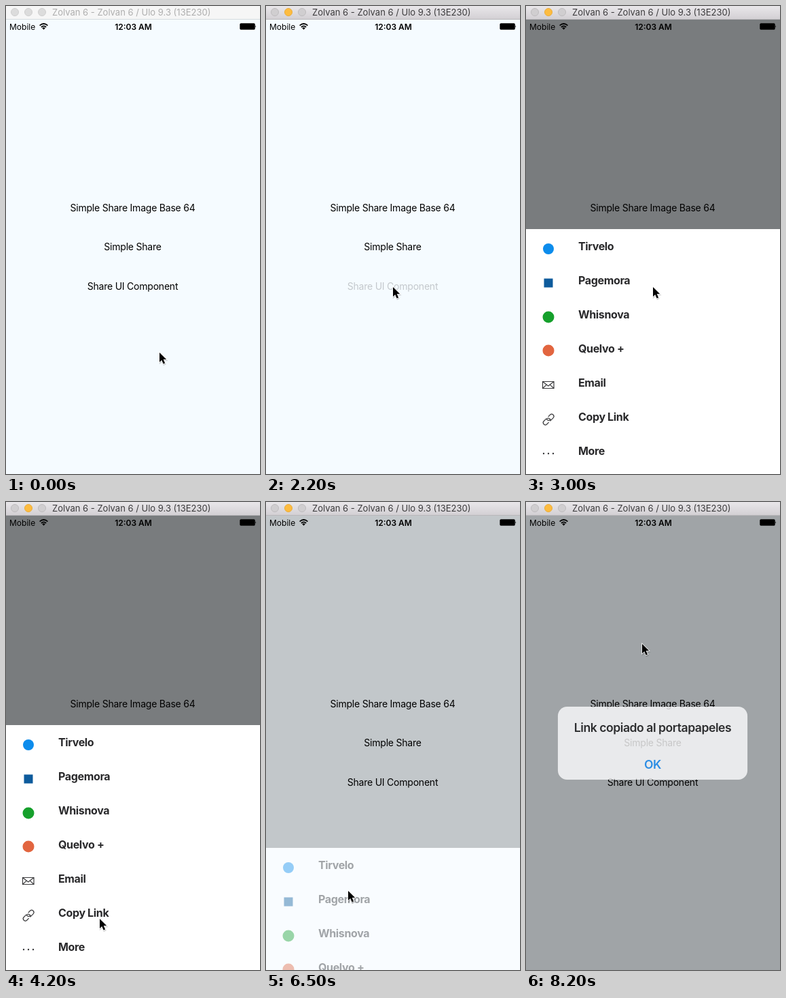
An HTML page for the animation above (8300 ms loop, 374x686 px).

```html
<!DOCTYPE html>
<html lang="en">
<head>
<meta charset="utf-8">
<title>Share sheet</title>
<style>
  html, body { margin: 0; width: 100%; height: 100%; overflow: hidden; background: #f5fbff; }
  svg { display: block; font-family: Inter, Roboto, sans-serif; }
  .page { font-size: 14px; letter-spacing: -.22px; text-anchor: middle; }
  .status { font-size: 12px; }
  .label { font-size: 16px; font-weight: 650; letter-spacing: -.35px; fill: #29292b; }
  .alert { font-size: 17px; font-weight: 600; letter-spacing: -.43px; text-anchor: middle; }
  .line { fill: none; stroke: #3c3c3e; stroke-width: 1.2; }
  .dot { fill: #dcdcdc; stroke: #cfcfcf; }
  .active .dot { fill: #d0ced0; stroke: #bebcbe; }
  .active .minimize { fill: #fdbc40; stroke: #eaad3b; }
  .bar { fill: #f6f6f6; }
  .active .bar { fill: url(#chrome); }
  .edge { fill: #d5dbdf; }
  .active .edge { fill: #b9b7ba; }
  .title { font-size: 13px; fill: #aeaeae; }
  .active .title { fill: #3c3b3d; }
</style>
</head>
<body>
<svg width="374" height="686" viewBox="0 0 374 686">
  <defs>
    <linearGradient id="chrome" x2="0" y2="1">
      <stop stop-color="#e9e7ea"/><stop offset="1" stop-color="#d3d0d4"/>
    </linearGradient>
    <path id="arrow" d="M0 0V14l3.2-3 2.4 5.5 2.5-1.1-2.4-5.3h4.4z"/>
  </defs>
  <rect width="374" height="686" fill="#f5fbff"/>

  <g class="page">
    <text x="186.5" y="301">Simple Share Image Base 64</text>
    <text x="186.5" y="358">Simple Share</text>
    <text id="shareButton" x="186.5" y="415.5">Share UI Component</text>
  </g>

  <g class="status">
    <text x="5" y="34.5">Mobile</text>
    <path d="M49.6 28.6Q55.5 23.4 61.4 28.6M51.9 31Q55.5 27.9 59.1 31" fill="none" stroke="#000" stroke-width="1.7"/>
    <path d="M53.2 32.2Q55.5 30.5 57.8 32.2L55.5 34.8Z"/>
    <text x="187.5" y="34.5" font-weight="600" text-anchor="middle">12:03 AM</text>
    <rect x="344.5" y="25.5" width="22" height="9" rx="1.5" fill="#000" stroke="#000" stroke-opacity=".4"/>
    <path d="M367.4 28.2q1.6 1.8 0 3.6z"/>
  </g>

  <g id="sheetLayer">
    <rect y="19" width="374" height="667" opacity=".505"/>
    <g id="sheet">
      <rect width="374" height="360" fill="#fff"/>
      <circle cx="33" cy="29" r="8" fill="#0c8cec"/>
      <rect x="26.5" y="72.5" width="13" height="13" fill="#0d5b9c"/>
      <circle cx="33" cy="129" r="8.5" fill="#16a02c"/>
      <circle cx="33" cy="178" r="8.5" fill="#e2653f"/>
      <path class="line" d="M24.5 223.5h16.5v10h-16.5zl8.25 6.4 8.25-6.4M24.5 233.5l6-5.6M41 233.5l-6-5.6"/>
      <g class="line" transform="translate(33 279) rotate(-45)" stroke-width="1.4">
        <path d="M1.5 2.2A3.2 3.2 0 0 1-1-3h0M-1-3h-5.5a3.2 3.2 0 0 0 0 6.4h4M-1.5-2.2A3.2 3.2 0 0 1 1 3.4h5.5a3.2 3.2 0 0 0 0-6.4h-4"/>
      </g>
      <path d="M26 329h14.5" stroke="#3c3c3e" stroke-width="2.4" stroke-linecap="round" stroke-dasharray="0 7"/>
      <g id="labels" class="label"></g>
    </g>
  </g>

  <g id="alertLayer">
    <rect y="19" width="374" height="667" opacity=".4"/>
    <g id="alertBox" class="alert">
      <rect x="-135" y="-51.7" width="270" height="103.4" rx="13" fill="#e8e8e9"/>
      <text y="-15.5" fill="#0c0c0d">Link copiado al portapapeles</text>
      <text y="36.7" fill="#0b7be0">OK</text>
    </g>
  </g>

  <g id="window">
    <rect class="bar" width="374" height="19"/>
    <rect class="edge" y="19" width="374" height="1"/>
    <circle class="dot" cx="13" cy="9" r="5.5"/>
    <circle class="dot minimize" cx="33" cy="9" r="5.5"/>
    <circle class="dot" cx="53" cy="9" r="5.5"/>
    <text class="title" x="68" y="14">Zolvan 6 - Zolvan 6 / Ulo 9.3 (13E230)</text>
  </g>

  <g id="cursor">
    <use href="#arrow" x=".6" y="1.4" stroke="#000" stroke-width="1.6" opacity=".18"/>
    <use href="#arrow" stroke="#fff" stroke-width="1.5" paint-order="stroke"/>
  </g>
</svg>
<script>
const LOOP = 8300, STEP = 100, STAGE_HEIGHT = 686, SHEET_HEIGHT = 359;
const $ = id => document.getElementById(id);
const set = (id, attrs) => {
  for (const name in attrs) $(id).setAttribute(name, attrs[name]);
};

const ramp = (t, from, to) => Math.min(1, Math.max(0, (t - from) / (to - from)));
const easeOut = u => 1 - (1 - u) ** 2;
const easeInOut = u => u < .5 ? 4 * u ** 3 : 1 - 4 * (1 - u) ** 3;

const rows = ['Tirvelo', 'Pagemora', 'Whisnova', 'Quelvo +', 'Email', 'Copy Link', 'More'];
$('labels').innerHTML = rows.map((name, i) => `<text x="77" y="${30.5 + 50 * i}">${name}</text>`).join('');

const home = { x: 226, y: 508 };
const moves = [
  { from: 0, to: 600, x: 152, y: 10 },
  { from: 800, to: 1700, x: 187, y: 412 },
  { from: 3100, to: 3900, x: 139, y: 611 },
  { from: 4100, to: 4500, x: 126, y: 603 },
  { from: 4900, to: 5200, x: 106, y: 428 },
  { from: 5300, to: 6100, x: 125, y: 603 },
  { from: 6350, to: 6800, x: 97, y: 378 },
  { from: 6900, to: 7500, x: 171, y: 208 }
];

function cursorAt(t) {
  return moves.reduce((p, m) => {
    const k = easeInOut(ramp(t, m.from, m.to));
    return { x: p.x + (m.x - p.x) * k, y: p.y + (m.y - p.y) * k };
  }, home);
}

function draw(time) {
  const t = Math.floor((time % LOOP) / STEP) * STEP;
  const cursor = cursorAt(t);
  const press = ramp(t, 2000, 2150) - ramp(t, 2200, 2450);
  const open = easeOut(ramp(t, 2200, 2610));
  const stay = 1 - easeInOut(ramp(t, 6200, 6800));
  const alert = easeOut(ramp(t, 8000, 8320));

  $('window').classList.toggle('active', t >= 2000);
  set('cursor', { transform: `translate(${Math.round(cursor.x)} ${Math.round(cursor.y)})` });
  set('shareButton', { opacity: 1 - .8 * press });
  set('sheetLayer', { opacity: open * stay ** 1.3 });
  set('sheet', { transform: `translate(0 ${Math.round(STAGE_HEIGHT - SHEET_HEIGHT * open * stay)})` });
  set('alertLayer', { opacity: alert });
  set('alertBox', { transform: `translate(186.5 353.5) scale(${1 + .24 * (1 - alert)})` });
}

const start = performance.now();
function tick() {
  draw(performance.now() - start);
  requestAnimationFrame(tick);
}
tick();
</script>
</body>
</html>
```
